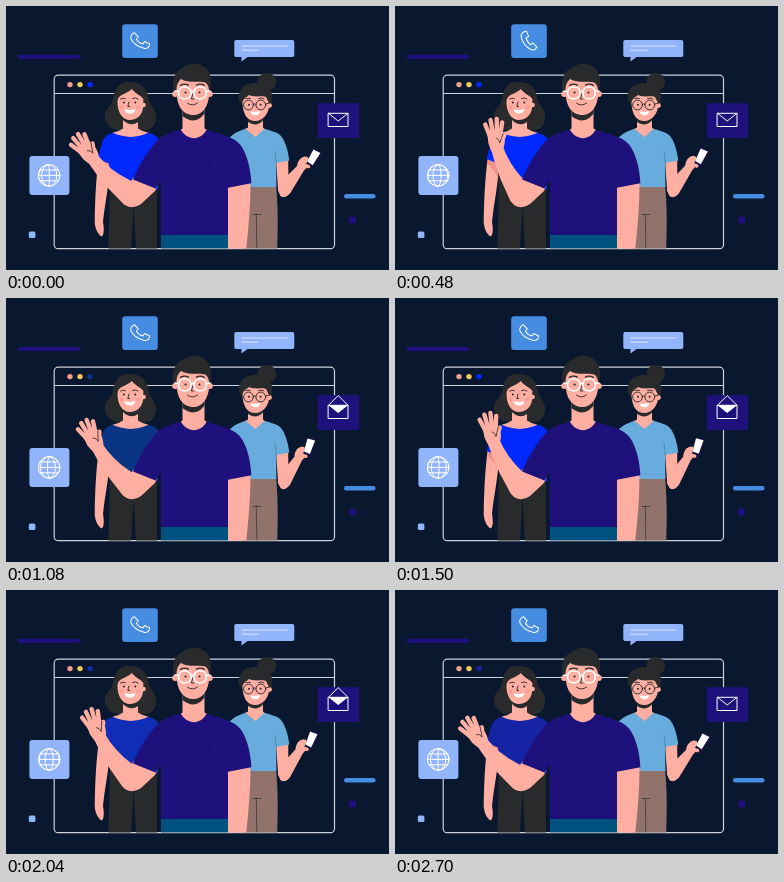
An HTML page for the animation above (2.73 s loop, 383 by 264 pixels).

```html
<!DOCTYPE html>
<html lang="en">
<head>
<meta charset="utf-8">
<title>Video call team</title>
<style>
  html, body { margin: 0; width: 100%; height: 100%; overflow: hidden; background: #09182f; }
  svg { display: block; width: 100vw; height: 100vh; }
  .skin { fill: #ffaea2; }
  .dark { fill: #282a2b; }
  .ink { fill: none; stroke: #282a2b; stroke-width: .9; stroke-linecap: round; stroke-linejoin: round; }
  .white { fill: none; stroke: #fff; stroke-width: 1; stroke-linecap: round; stroke-linejoin: round; }
  .frame { fill: none; stroke: #cdd1d8; stroke-width: 1.2; }
  .finger { fill: none; stroke: #ffaea2; stroke-width: 4.4; stroke-linecap: round; }
  .pale { fill: #92b4fb; }
  .navy { fill: #1e117c; }
  .sky { fill: #468ce1; }
</style>
</head>
<body>
<svg viewBox="0 0 383 264" preserveAspectRatio="none">
  <rect width="383" height="264" fill="#09182f"/>

  <!-- floating shapes -->
  <rect class="navy" x="11.5" y="48.8" width="62.5" height="4.2" rx="2"/>
  <rect class="sky" x="338" y="188" width="31.5" height="4.4" rx="2.2"/>
  <rect class="navy" x="343" y="210.5" width="7" height="7" rx="1.5"/>
  <rect class="pale" x="22.8" y="225.5" width="6.6" height="6.6" rx="1.5"/>

  <!-- window -->
  <rect class="frame" x="48.2" y="69.2" width="280.3" height="173.5" rx="4"/>
  <path class="frame" d="M48.2 87.5H328.5"/>
  <circle cx="64" cy="78.6" r="2.7" fill="#f5a08f"/>
  <circle cx="74" cy="78.6" r="2.7" fill="#f0cb5a"/>
  <circle class="tint" cx="84" cy="78.6" r="2.7"/>

  <!-- call -->
  <rect class="sky" x="116.2" y="18.2" width="35.6" height="33.8" rx="3"/>
  <path id="call" class="white" d="M-7.5 -7l2.5-1.5l3.5 4.5l-2.2 2.2q2 4 6 5.4l2-2.2l4.7 3l-1.2 3q-2 1.6-5 .6q-9-3-12-11q0-2.6 1.7-4z"/>

  <!-- message -->
  <path class="pale" d="M230 34H286.5Q288.3 34 288.3 36V49Q288.3 51 286.5 51H241.5L235.5 55.5V51H230Q228.3 51 228.3 49V36Q228.3 34 230 34z"/>
  <path class="white" style="stroke-width:.8" d="M236 40H281M236 44.2H252.5" opacity=".85"/>

  <!-- mail -->
  <rect class="navy" x="311.8" y="97.2" width="41.4" height="34.8"/>
  <path id="letter" fill="#fff" d="M322.5 107.3H342L332.2 115z"/>
  <rect class="white" x="322.5" y="107.3" width="19.5" height="13.2"/>
  <path id="flap" class="white"/>

  <!-- globe -->
  <rect class="pale" x="23.4" y="150" width="40" height="39" rx="3"/>
  <g class="white">
    <circle cx="43.2" cy="169.4" r="10.8"/>
    <path d="M32.4 169.4H54M33.8 164H52.6M33.8 174.8H52.6"/>
    <path id="globe"/>
  </g>

  <!-- woman on the left -->
  <path class="dark" d="M123 76C111 76 109 84 107 93C105 101 99 103 98.8 110C99 119 107 124.5 116 124.5H138C147 124 151 117 150 109C149 102 143 99 142 90C140 80 133 76 123 76z"/>
  <path class="skin" d="M93 150C90 171 89 196 88.7 216C89 223 92 228 95.5 230.5C98.5 229 98 222 97 216C99 196 103 181 104 158z"/>
  <path fill="#ef9089" d="M93.2 150L104 156L103 172Q99 163 92.6 158z"/>
  <path class="dark" d="M103.6 165H151V242.4H130L127.6 200L125 242.4H102.5C103 216 104 195 103.6 165z"/>
  <path class="tint" d="M108 126.5C101 128 98 131 96 137L91.5 153L103 157.5L103.6 168L152 184V132C148 128 145 127.5 141 126.5Q125 133 108 126.5z"/>
  <path class="skin" d="M117 108H132V122.5Q136 125.5 142.5 126.8Q125 135 106.5 126.8Q113 125.5 117 122.5z"/>
  <path class="dark" d="M117 109Q125 116 132 109V116Q125 121.5 117 114z"/>
  <path class="skin" d="M111.5 96C111.5 88 119 89 126 83C129 88 135 89 137.4 93L137 102C136 110 130 114 124 114C116 114 111.5 106 111.5 96z"/>
  <circle class="skin" cx="137.6" cy="99" r="2.2"/>
  <path class="ink" d="M114.5 93Q117 91.3 119.5 92.7M126.5 92.5Q129.5 91 132 93M123 96L121.8 100.5H123.6"/>
  <circle class="dark" cx="117.8" cy="96.6" r="1"/>
  <circle class="dark" cx="129.3" cy="96.6" r="1"/>
  <path fill="#fff" d="M118.5 103.3Q124 105 129.5 103Q128.5 107.6 124 107.6Q119.5 107.6 118.5 103.3z"/>
  <g fill="#fa8c86" opacity=".55"><circle cx="115.5" cy="101.5" r="2"/><circle cx="132.3" cy="101.5" r="2"/></g>

  <!-- woman on the right -->
  <path fill="#91736c" d="M237 178H270C272 200 272 220 271.2 242.4H236z"/>
  <path class="ink" d="M250.3 208L250.8 242M247 208.5H255" opacity=".7"/>
  <path class="skin" d="M270 153H282.3C282 165 283 177 283 185Q282 191 277 191.2Q273.5 190 272 183z"/>
  <g id="forearm">
    <path class="skin" d="M272 184L279 172L291 160C292 154 295 151 299.5 150.5L306 154.5Q307 158 302 160.5L298 164.5L284 187.5Q279 193 274.5 190z"/>
    <g id="mobile">
      <path fill="#15123c" d="M309 142L316 145.2Q317 146 316.2 147.5L307 162.5Q306.2 164 304.6 163L299 159.5z"/>
      <path fill="#fff" d="M307.4 143.4L314.4 147L306.6 159.2L301.2 155.6z"/>
    </g>
    <path class="finger" style="stroke-width:3.4" d="M296 158L302.5 160.6M296.5 154.5L300.5 152.6"/>
  </g>
  <path fill="#67acdc" d="M240 122.5C231 125.5 224 129 221 136V181H270.4L270.2 157L283.3 154.5C282 144 279 134 274 129C270 125.5 263 124.5 258 122.5C253 129 245 129 240 122.5z"/>
  <path class="ink" d="M269 145L270.2 157" opacity=".3"/>
  <circle class="dark" cx="260.8" cy="76" r="9.3"/>
  <path class="dark" d="M233 95C231 83 239 77 249 77C261 77 267.5 84 266 94L263 104L238 101z"/>
  <path class="skin" d="M242 108H257V121.5L258.5 123L249.5 131L239.5 123L242 121.5z"/>
  <path class="dark" d="M242 110Q250 116 257 109V114.5Q250 121.5 242 116z"/>
  <path class="skin" d="M236.5 97C237 92 241 91 243 89C250 92 257 89 260 91L263 97C264 108 256 115 249.5 115C241 115 237 108 236.5 97z"/>
  <circle class="skin" cx="263.5" cy="99.5" r="2.4"/>
  <g class="ink">
    <circle cx="242.5" cy="99" r="4.9"/><circle cx="254.8" cy="99" r="4.9"/>
    <path d="M247.4 98.3Q248.8 97.3 249.9 98.3M259.6 98L264 97M239.5 92.6Q242 91.4 244.5 92.5M252.5 92.5Q255 91.3 258 92.8"/>
  </g>
  <circle class="dark" cx="243" cy="98.8" r="1"/>
  <circle class="dark" cx="254.6" cy="98.8" r="1"/>
  <path fill="#fff" d="M244.5 105.2Q249.5 106.4 254.5 105Q253.6 109.2 249.5 109.2Q245.4 109.2 244.5 105.2z"/>

  <!-- waving arm -->
  <path class="skin" d="M128 171L151 180L149 185L135 198Q127 204 119 199Q113 192 117 185z"/>
  <g id="wave">
    <path class="skin" d="M95.5 139Q99 157 106 174L115.4 195Q121 202 130 200Q139 194 136 182L128 173Q114 158 107.5 139z"/>
    <g id="hand">
      <path class="skin" d="M92.5 127Q100 120 107.5 126L110 134Q110 141 107 145L97 146Q95 142 93.5 137z"/>
      <path class="finger" d="M95.5 131L90.5 118.5M98.2 128L95.8 114M102 128L102 113M105.5 129L107.4 116.5M106 137L109.6 128.5"/>
      <path class="ink" style="stroke-width:.75" d="M101.5 132Q104.5 133 105 137Q107 131 108.4 127.5"/>
    </g>
  </g>

  <!-- man -->
  <path class="skin" d="M222 178L244.5 176C244.5 200 242.5 222 240.2 242.4H222z"/>
  <rect x="155" y="228" width="67" height="14.4" fill="#00527f"/>
  <path class="navy" d="M175 123.5C165 127 156 128.5 150.5 135C141 146 133 159 127 173.5L149.5 182.5L154.8 174V229H222V181.7L245.4 177.2C244.5 160 240 146 234 138.5C227 129.5 211 128 200.5 123.5C194 130 182 130 175 123.5z"/>
  <path class="ink" style="stroke:#120a55" d="M203 151.5H219V163L211 166L203 163z" opacity=".3"/>
  <path class="skin" d="M176.5 100H198.5V122.5L200.7 123.6C195 135 181 135 174.8 123.6L176.5 122.5z"/>
  <path class="dark" d="M176.5 102Q188 112 198.5 101V107.5Q189 120 176.5 110z"/>
  <path class="dark" d="M168 87C165 74 168.5 65 178 61C187 54 202 59 204 69C206 76 204.5 82 203.5 89z"/>
  <circle class="skin" cx="169.2" cy="88" r="3"/>
  <circle class="skin" cx="203.8" cy="88" r="3"/>
  <path class="skin" d="M170.5 83C171 78 172 76 175 73C183 78 194 74 200 77Q203.3 80 203.2 87C203 101 196 109 187.5 109C177 109 170 100 170.5 83z"/>
  <path class="ink" style="stroke-width:1.3" d="M174.4 79.4Q178.4 77.2 182.4 79.1M190.4 79.1Q194.4 77.2 198.4 79.4"/>
  <circle class="dark" cx="179.6" cy="86.5" r="1.1"/>
  <circle class="dark" cx="193.4" cy="86.5" r="1.1"/>
  <g class="white" style="stroke-width:1.5">
    <rect x="172.6" y="81" width="12.3" height="11.8" rx="5.3"/>
    <rect x="188" y="81" width="12.3" height="11.8" rx="5.3"/>
    <path d="M184.9 86Q186.5 84.5 188 86M172.4 85.5L169 85M200.5 85.5L204 85"/>
  </g>
  <path class="ink" d="M186.8 88L185.4 93H187.8M181.5 97.2Q186.5 101 191.5 97"/>
</svg>
<script>
  const LOOP = 2730;
  const TAU = Math.PI * 2;
  const $ = id => document.getElementById(id);
  const tinted = document.querySelectorAll('.tint');
  const tints = [[0, '#0029ff'], [780, '#0a3585'], [1290, '#0029ff'],
                 [1770, '#0f2db5'], [2235, '#0b3380'], [2565, '#1523a5']];

  const turn = (id, deg, x, y) => $(id).setAttribute('transform', `rotate(${deg} ${x} ${y})`);
  const ramp = (t, from, to) => {
    const k = Math.min(1, Math.max(0, (t - from) / (to - from)));
    return k * k * (3 - 2 * k);
  };

  function meridians(shift) {
    const r = 10.8;
    let d = '';
    for (let k = 0; k < 4; k++) {
      const x = r * Math.sin((k + shift - 2) * Math.PI / 4);
      d += `M43.2 158.6A${Math.abs(x) + .01} ${r} 0 0 ${x > 0 ? 1 : 0} 43.2 180.2`;
    }
    return d;
  }

  function draw(t) {
    const swing = (1 + Math.cos(TAU * t * 3 / LOOP)) / 2;
    turn('wave', -20 * swing, 126, 190);
    turn('hand', -11 * swing, 101, 142);

    const lift = (1 - Math.cos(TAU * t / LOOP)) / 2;
    turn('forearm', -6 * lift, 277, 187);
    turn('mobile', -7 * lift, 302, 158);

    const ring = t > 240 && t < 720 ? -20 * Math.sin(Math.PI * (t - 240) / 160) : 0;
    $('call').setAttribute('transform', `translate(134.2 34.6) rotate(${ring - 6})`);

    const open = ramp(t, 600, 900) - ramp(t, 2100, 2350);
    $('flap').setAttribute('d', `M322.5 107.3L332.2 ${115 - 17.4 * open}L342 107.3`);
    $('letter').setAttribute('opacity', ramp(open, .4, .7));

    $('globe').setAttribute('d', meridians(t * 2 / LOOP % 1));

    const tint = tints.filter(step => step[0] <= t).pop()[1];
    tinted.forEach(el => el.setAttribute('fill', tint));
  }

  const start = performance.now();
  function tick() {
    draw((performance.now() - start) % LOOP);
    requestAnimationFrame(tick);
  }
  tick();
</script>
</body>
</html>
```
